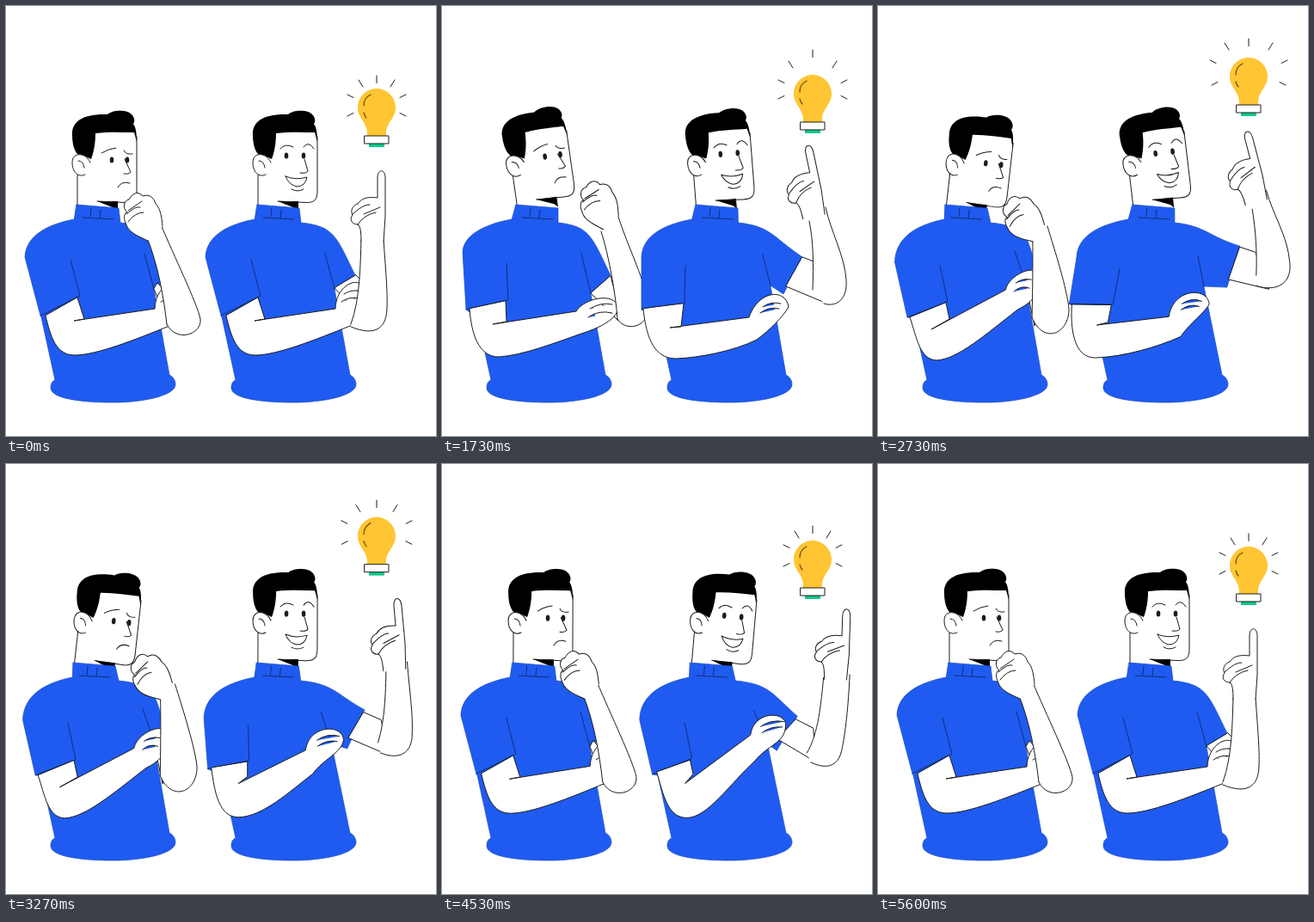
Recreate the animation shown at these times as an HTML page with a canvas. Size 500 px wide and 500 px high, loop 5630 ms.

```html
<!DOCTYPE html>
<html lang="en">
<head>
<meta charset="utf-8">
<title>Thinking and finding an idea</title>
<style>
html, body { margin: 0; width: 100%; height: 100%; overflow: hidden; background: #fff; }
canvas { display: block; }
</style>
</head>
<body>
<canvas id="stage" width="500" height="500"></canvas>
<script>
const ctx = document.getElementById('stage').getContext('2d');
const LOOP = 5630, INK = '#1c1c1c', NAVY = '#122e78', BLUE = '#1f5bf0';

// Poses: shirt points, upper arm, folded arm, forearm, wrist (x y angle), head angle
const think = {
  shirt: '0 22 292 40 360 86 337 75 295 196 313 173 327 161 288 172 329',
  upper: 'M176 322L188 335L190 372L172 329Z',
  bent: 'M46 360C52 385 58 406 80 406C105 406 150 388 190 372C205 367 212 350 204 328C203 314 174 322 173 352L79 366L91 364L83 339ZM183 335Q190 330 200 331M180 344Q190 337 200 340',
  fore: 'M187 370C183 335 176 300 165 272L180 254C195 290 222 345 226 364C228 382 198 392 187 370',
  hand: '172 263 0',
  head: '0'
};
const lean = {
  shirt: '3 23 290 30 355 79 341 75 299 190 317 173 331 163 288 172 331',
  upper: 'M190 317L200 335L206 370L172 332Z',
  bent: 'M34 354C40 385 42 408 68 408C95 406 130 392 168 378C188 374 206 368 202 346C200 332 170 338 160 356L63 372L80 369L77 341ZM172 349Q185 343 196 346M171 357Q184 350 196 354',
  fore: 'M206 372C202 340 194 290 184 262L196 238C208 275 232 325 238 350C238 372 218 382 206 372',
  hand: '190 251 -4',
  head: '-6'
};
const back = {
  shirt: '4 24 286 28 353 77 342 75 299 196 313 174 334 162 288 173 334',
  upper: 'M196 314L203 340L205 366L173 334Z',
  bent: 'M32 352C34 380 42 408 66 408C95 406 130 392 162 381C190 372 204 362 205 350C200 332 165 340 156 355L59 370L75 367L74 343ZM172 352Q185 344 198 347M170 362Q182 353 198 357',
  fore: 'M204 364C202 335 194 290 185 262L203 238C213 275 240 325 240 352C238 376 212 378 204 364',
  hand: '195 250 2',
  head: '-8'
};
const bow = {
  shirt: '-4 19.5 298 34 362 81 344 72 302 182 300 172 320 159 285 171 320',
  upper: 'M176 310L182 340L182 372L172 325Z',
  bent: 'M37 362C45 385 48 411 68 412C92 411 125 382 162 353C178 345 190 335 184 312C183 300 152 312 148 330L62 376L83 364L79 345ZM160 322Q168 316 178 318M158 332Q166 324 176 328',
  fore: 'M179 362C180 320 180 295 180 272L197 256C206 285 220 330 222 352C222 382 192 394 179 362',
  hand: '185 263 -10',
  head: '6.5'
};
const point = {
  ...think,
  upper: 'M197 313L202 318L192 350L172 328Z',
  fore: 'M191 370C202 340 202 300 203 272L229 272C231 300 234 335 233 350C233 372 222 386 191 373',
  hand: '216 272 0'
};
const raise = {
  shirt: '3 22 292 22 353 72 346 73 302 209 292 187 335 163 289 172 325',
  upper: 'M209 292L222 297L240 347L190 326Z',
  bent: 'M24 352C27 380 34 410 62 410C90 409 130 401 156 388C172 376 186 362 193 350C190 328 158 330 147 362L55 374L68 373L71 346ZM163 350Q172 343 184 346M160 357Q170 349 182 352',
  fore: 'M221 330C222 300 222 275 217 250L236 234C242 262 258 290 260 318C262 345 245 350 234 346',
  hand: '222 243 -12',
  head: '-4.5'
};
const reach = {
  shirt: '4 21 292 12 346 63 347 71 306 211 279 196 327 162 290 169 326',
  upper: 'M211 280L229 286L245 329L198 318Z',
  bent: 'M15 347C13 375 17 409 42 409C75 408 115 397 142 385C150 372 172 355 175 347C172 326 132 330 128 362L44 371L57 368L61 348ZM143 347Q155 339 166 344M142 354Q152 346 163 350',
  fore: 'M230 313C231 285 229 260 225 236L241 214C250 245 266 265 269 298C272 325 250 332 230 325',
  hand: '229 226 -15',
  head: '-7'
};
const aside = {
  shirt: '-4 19.5 298 34 361 80 343 72 302 204 291 180 334 152 287 168 325',
  upper: 'M202 295L224 306L228 346L181 319Z',
  bent: 'M39 358C47 385 52 412 74 412C98 412 122 370 150 342C165 322 186 322 188 302C190 284 150 282 146 311L72 372L81 360L78 345ZM158 302Q170 293 186 296M160 309Q170 301 184 302',
  fore: 'M217 332C228 315 233 290 237 246L268 242C266 280 262 310 257 332C252 350 238 352 222 344',
  hand: '251 246 2',
  head: '5.5'
};

const men = [
  {
    x: 0,
    poses: [think, lean, back, bow, think],
    times: [0, 200, 1000, 1450, 1850, 2650, 3700, 4500, 4700, LOOP],
    steps: [0, .06, 1, 2, 2, 3, 3.05, 3.96, 4, 4],
    eyes: [123, 141, 179],
    face: 'M111 171Q119 166 128 165M137 168Q139 173 147 172M138 178L145 193Q143 196 137 195M130 211Q134 203 144 206',
    fist: 'M165 273C155 268 142 264 139 252C136 246 138 240 141 240C135 235 137 226 143 225C147 217 154 215 159 221C168 218 172 224 174 230C180 236 181 246 182 256',
    folds: 'M142 238L158 227M140 242Q151 232 156 234M142 251Q150 240 160 240',
    wrist: [172, 263]
  },
  {
    x: 210,
    poses: [point, raise, reach, aside, point],
    times: [0, 1000, 1730, 2350, 2800, 3650, 4530, 4870, 5350, LOOP],
    steps: [0, .04, 1, 2, 2.02, 3, 3.1, 3.55, 4, 4],
    eyes: [116, 136, 174],
    face: 'M109 166Q115 159 124 164M136 164Q142 156 148 166M137 178L141 192Q139 195 132 194M115 198Q127 203 140 199Q138 210 128 210Q119 208 115 198ZM122 213Q129 217 136 213',
    fist: 'M203 274C203 262 202 256 199 254C192 254 189 248 193 243C190 238 193 232 199 230C204 222 214 222 222 223L222 200C222 189 231 189 231 200L231 245L229 274',
    folds: 'M193 242Q206 230 213 231M199 254Q206 243 220 240M206 242L225 234',
    wrist: [216, 272]
  }
];

// Monotone cubic through (ts, vs)
function ease(ts, vs, t) {
  let i = 0;
  while (i < ts.length - 2 && t >= ts[i + 1]) i++;
  const rate = j => (vs[j + 1] - vs[j]) / (ts[j + 1] - ts[j]);
  const slope = j => {
    if (j < 1 || j > ts.length - 2) return 0;
    const a = rate(j - 1), b = rate(j);
    return a * b > 0 ? 2 * a * b / (a + b) : 0;
  };
  const h = ts[i + 1] - ts[i], k = (t - ts[i]) / h, q = 1 - k;
  return vs[i] * q * q * (1 + 2 * k) + vs[i + 1] * k * k * (3 - 2 * k)
    + h * k * q * (slope(i) * q - slope(i + 1) * k);
}

const NUM = /-?[\d.]+/g;
const numbers = s => s.match(NUM).map(Number);
function mix(a, b, k) {
  const end = numbers(b);
  let i = 0;
  return a.replace(NUM, n => (+n + (end[i++] - n) * k).toFixed(2));
}

function draw(path, fill, stroke, width = 1) {
  const p = new Path2D(path);
  if (fill) { ctx.fillStyle = fill; ctx.fill(p); }
  if (stroke) { ctx.strokeStyle = stroke; ctx.lineWidth = width; ctx.stroke(p); }
}

function dot(x, y, rx, ry) {
  ctx.fillStyle = INK;
  ctx.beginPath();
  ctx.ellipse(x, y, rx, ry, 0, 0, 7);
  ctx.fill();
}

// Moves the point (px, py) to (x, y) and turns around it
function placed(x, y, px, py, angle, paint) {
  ctx.save();
  ctx.translate(x, y);
  ctx.rotate(angle * Math.PI / 180);
  ctx.translate(-px, -py);
  paint();
  ctx.restore();
}

function drawHead(man, angle) {
  placed(98 - .42 * angle, 225 + .1 * angle, 98, 225, angle, () => {
    draw('M83 185L83 242L130 242L130 228L140 229C149 229 152 224 152 215L152 146L104 146Z', '#fff');
    draw('M106 227L130 227L130 239L126 235Z', '#000');
    draw('M83 196L83 232M152 152L152 215C152 226 148 229 138 228.5L106 227', null, INK);
    draw('M90 174C82 176 77 165 77 150C76 134 90 125 118 126C124 121 140 120 146 126C150 130 150 135 148 137C151 141 152 148 152 158L149 147C135 147 120 146 104 148C104 160 102 170 99 178Z', '#000');
    draw('M98 182C93 170 77 169 77 182C77 193 84 200 92 196L99 190Z', '#fff');
    draw('M98 182C93 170 77 169 77 182C77 193 84 200 92 196M84 180Q90 180 91 188', null, INK);
    const [a, b, y] = man.eyes;
    dot(a, y, 2.3, 3.6);
    dot(b, y, 2.3, 3.6);
    draw(man.face, null, INK);
  });
}

function drawShirt(spec) {
  const [s, mx, my, ox, oy, ix, iy, tx, ty, px, py, qx, qy, ux, uy, vx, vy] = numbers(spec);
  draw(`M${82 + s} 231L${131 + s} 235L${133 + s / 2} 252C172 256 174 268 ${px} ${py}L${qx} ${qy}L${vx} ${vy}`
    + 'L190 429C194 431 197 435 197 440C197 453 160 461 124 461C85 461 52 456 52 444C52 439 54 436 57 435L41 362'
    + `L${ox} ${oy}L${mx} ${my}C${mx + 1} 267 48 254 ${79 + s / 2} 248Z`, BLUE, '#1a4cc8', .7);
  draw(`M${89 + s} 246L${125 + s} 248M${99 + s} 235L${98 + s} 245M${110 + s} 237L${109 + s} 247`
    + `M${tx} ${ty}L${ix} ${iy}L${ox} ${oy}M${ux} ${uy}L${vx} ${vy}`, null, NAVY);
}

function drawMan(man, t) {
  const step = ease(man.times, man.steps, t);
  const i = Math.min(3, Math.floor(step));
  const part = name => mix(man.poses[i][name], man.poses[i + 1][name], step - i);
  const fore = part('fore');
  const [x, y, turn] = numbers(part('hand'));
  ctx.save();
  ctx.translate(man.x, 0);
  drawHead(man, +part('head'));
  drawShirt(part('shirt'));
  draw(part('upper'), '#fff', INK);
  draw(part('bent'), '#fff', INK);
  draw(fore, '#fff');
  draw(fore.replace('L', 'M'), null, INK);
  placed(x, y, ...man.wrist, turn, () => {
    draw(man.fist, '#fff', INK);
    draw(man.folds, null, INK);
  });
  ctx.restore();
}

const beats = [0, 1000, 1730, 2730, 3730, 4530, LOOP];
const bulbTop = [96, 92, 80, 60, 65, 89, 96];
// Each ray: tip distance from the axis, tip height, vector to the inner end
const rays = [
  { x: [0, 0, 0, 0, 0, 0, 0], y: [81, 69, 51, 38, 49, 72, 81], to: [0, 8.5] },
  { x: [21, 22, 28, 28, 21, 21, 21], y: [86, 80, 64, 43, 55, 78, 86], to: [-5, 8] },
  { x: [34, 34, 40, 45, 37, 34, 34], y: [103, 99, 86, 63, 71, 94, 103], to: [-7, 3.5] },
  { x: [34, 34, 40, 43, 38, 34, 34], y: [128, 124, 108, 92, 96, 119, 128], to: [-7, -3.5] }
];

function drawBulb(t) {
  ctx.save();
  ctx.translate(431, 0);
  for (const { x, y, to } of rays) {
    const rx = ease(beats, x, t), ry = ease(beats, y, t);
    for (const side of rx ? [-1, 1] : [1])
      draw(`M${side * rx} ${ry}L${side * (rx + to[0])} ${ry + to[1]}`, null, INK);
  }
  ctx.translate(0, ease(beats, bulbTop, t));
  draw('M0 0C12 0 22 10 22 22C22 35 11 39 11 52L11 55L-11 55L-11 52C-11 39 -22 35 -22 22C-22 10 -12 0 0 0Z', '#ffc532');
  draw('M-15 20Q-15 11 -7 7M-15 28Q-14 32 -12 34', null, '#6b4d0c', 1.2);
  draw('M-9 64L9 64L9 68L-9 68Z', '#0cc98a');
  draw('M-14 55L14 55L14 64L-14 64Z', '#fff', INK);
  ctx.restore();
}

ctx.lineCap = ctx.lineJoin = 'round';
function frame() {
  const t = performance.now() % LOOP;
  ctx.fillStyle = '#fff';
  ctx.fillRect(0, 0, 500, 500);
  for (const man of men) drawMan(man, t);
  drawBulb(t);
  requestAnimationFrame(frame);
}
frame();
</script>
</body>
</html>
```
